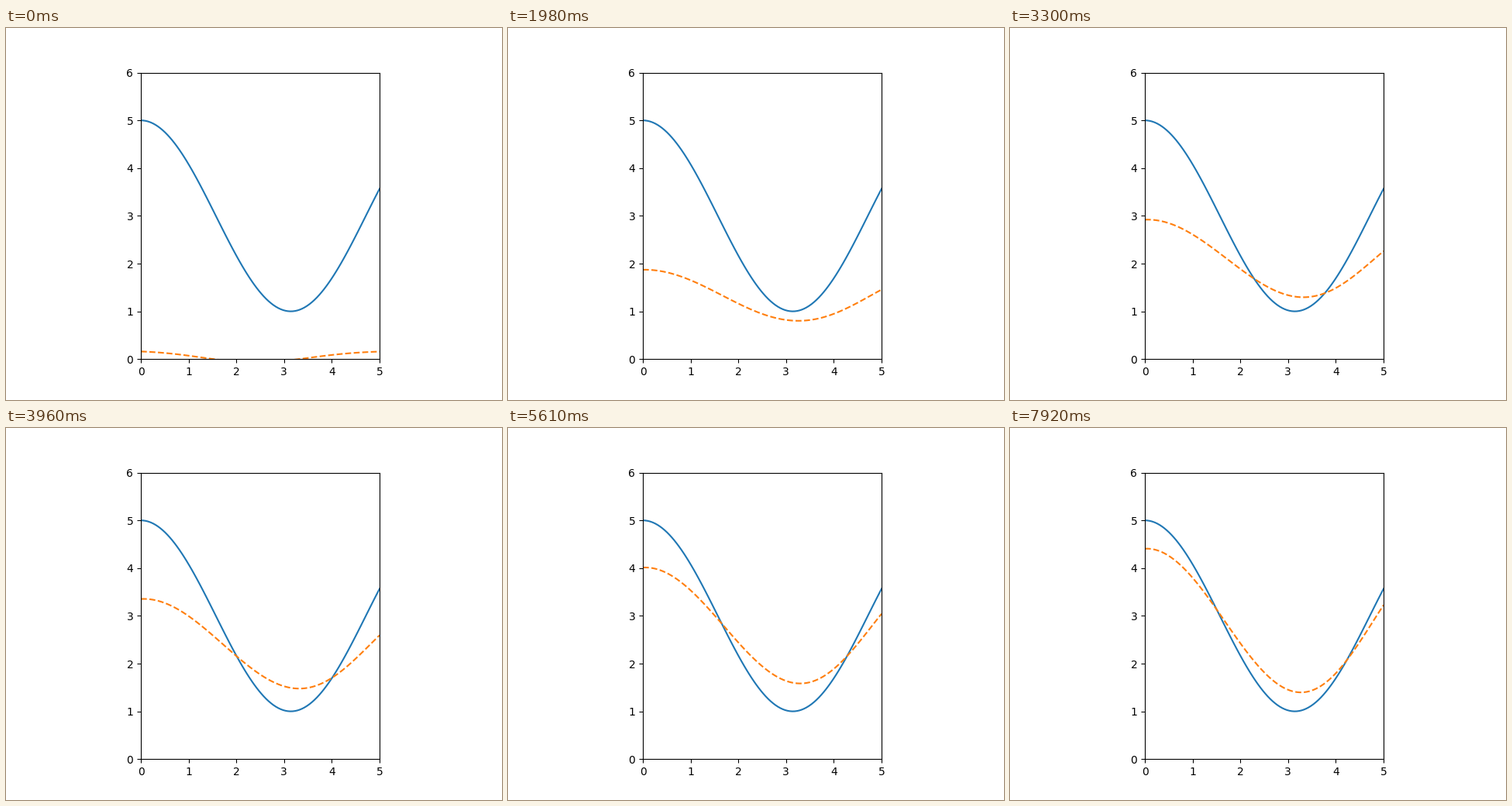
Write a matplotlib script that moves like this. It is 640x480 px and loops after 8 s.

```python
import numpy as np
import matplotlib.pyplot as plt
from matplotlib.animation import FuncAnimation

LOOP_MS, TICK_MS, STEP_MS = 8000, 40, 330


def goal(x):
    return 3 + 2 * np.cos(x)


def softplus(t):
    return np.log1p(np.exp(t))


def fit(x, step):
    """The goal minus the error still left after some training steps."""
    wave = 1.91 * (1 - np.tanh(step / 25.4))
    # The offset falls at a steady rate, then flattens out near step 13.
    offset = 0.18 * wave + 0.411 * softplus((12.9 - step) / 2.05)
    skew = 0.13 * np.tanh((step - 4) / 6)
    error = offset + wave * np.cos(x)
    return goal(x) - error + skew * (np.sin(x) - 0.25 * np.sin(2 * x))


x = np.linspace(0, 5, 100)

fig, ax = plt.subplots(figsize=(6.4, 4.8), dpi=100)
ax.set_aspect("equal")
ax.set(xlim=(0, 5), ylim=(0, 6), xticks=range(6), yticks=range(7))
ax.plot(x, goal(x), color="C0")
fit_line, = ax.plot(x, fit(x, 0), "--", color="C1")


def update(tick):
    step = int((tick + 0.5) * TICK_MS // STEP_MS)
    fit_line.set_ydata(fit(x, step))
    return fit_line,


anim = FuncAnimation(fig, update, frames=LOOP_MS // TICK_MS,
                     interval=TICK_MS, repeat=True, repeat_delay=0)
plt.show()
```
